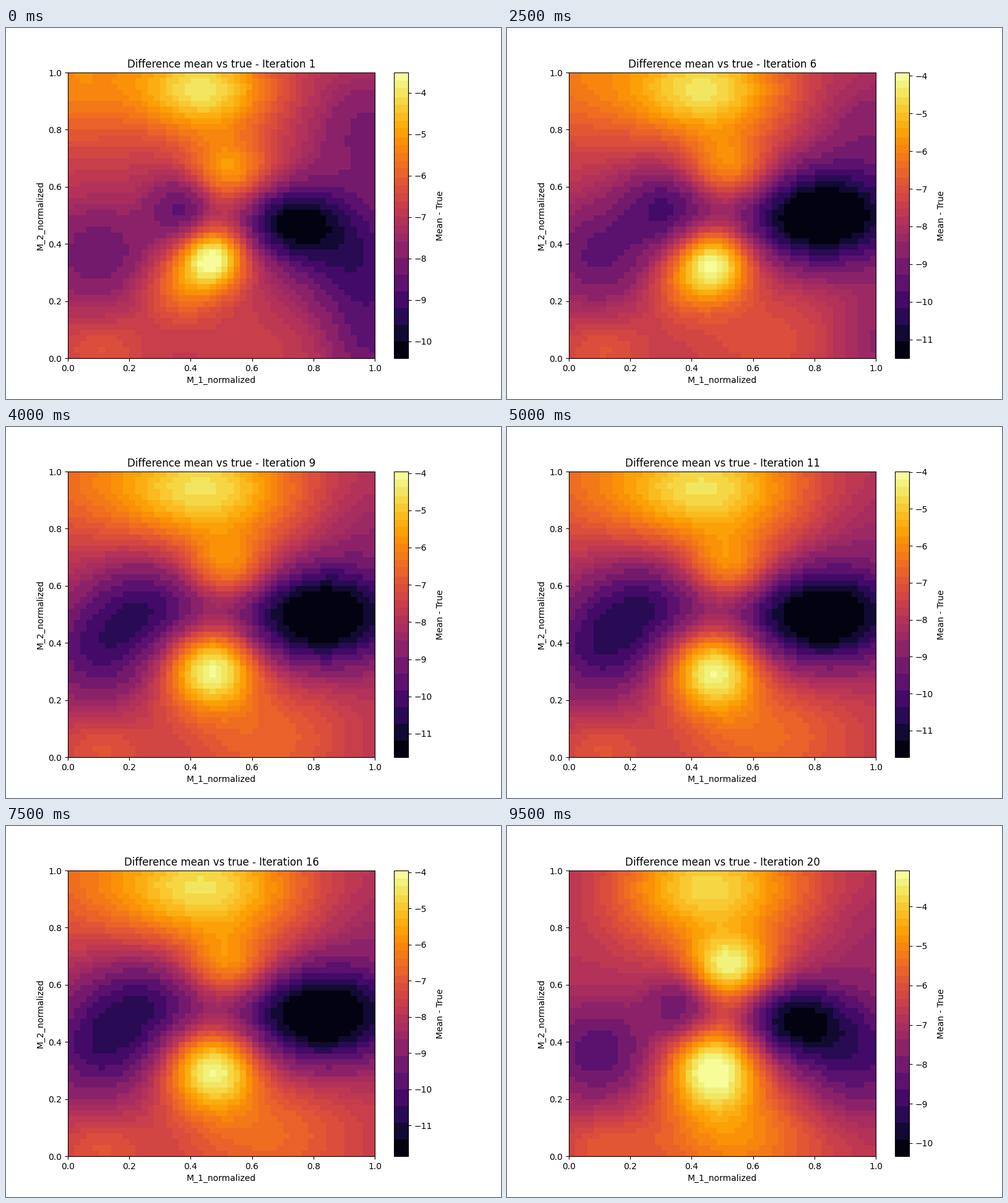
A matplotlib script that plays this animation: 800x600 px, repeating every 10000 ms.

```python
import matplotlib.pyplot as plt
import numpy as np
from matplotlib.animation import FuncAnimation
from matplotlib.colors import ListedColormap

ITERATIONS = 20
CELLS = 50
X, Y = np.meshgrid(np.linspace(0, 1, CELLS), np.linspace(0, 1, CELLS))


def ease(value, start, end):
    u = np.clip((value - start) / (end - start), 0, 1)
    return u * u * (3 - 2 * u)


def mix(a, b, u):
    return a + (b - a) * u


def hill(x, y, width, height, strength):
    return strength * np.exp(-((X - x) / width) ** 2 - ((Y - y) / height) ** 2)


def surface(iteration):
    """Difference surface as a share of the colour range."""
    grow = ease(iteration, 2, 11)
    reset = ease(iteration, 16, 20)
    left = grow * (1 - reset)
    right = ease(iteration, 1, 5) * (1 - reset)

    top = (hill(.45, .95, mix(.22, .32, grow), mix(.16, .20, grow), .41)
           + hill(0, 1, .30, .25, .24 - .12 * grow - .17 * reset))
    middle = hill(.52, .66, .15, .12, mix(.28, .44, reset))
    peak = (hill(.47, mix(.35, .31, grow), mix(.112, .155, grow),
                 mix(.11, .15, grow), .5)
            + hill(.36, .24, .13, .12, mix(.18, 0, grow)))
    bottom = (hill(mix(.65, .55, reset), .06, .30, .20,
                   .04 + .13 * grow + .07 * reset)
              + hill(.1, .02, .15, .12, .11))

    left_hollow = (hill(mix(.37, .25, left), .53, mix(.11, .23, left),
                        mix(.13, .18, left), mix(-.25, -.30, left))
                   + hill(.09, .36, .19, .18, mix(-.20, -.25, grow)))
    right_hollow = (hill(mix(.73, .83, right), mix(.48, .495, right),
                         mix(.16, .26, right), mix(.13, .17, right),
                         mix(-.42, -.60, right))
                    + hill(.93, .36, .22, .22, mix(-.30, 0, right)))
    corners = (hill(1, .80, .20, .20, mix(-.17, -.07, grow))
               + hill(1, .05, .15, .20, mix(-.20, 0, grow)))

    total = (.5 + top + middle + peak + bottom
             + left_hollow + right_hollow + corners)
    return np.clip(total, 0, 1)


def state(iteration):
    keys = [1, 4, 6, 11, 16, 20]
    low = np.interp(iteration, keys,
                    [-10.41, -11.44, -11.50, -11.72, -11.85, -10.33])
    high = np.interp(iteration, keys,
                     [-3.51, -3.74, -3.91, -3.99, -3.95, -3.09])
    return mix(low, high, surface(iteration)), low, high


def banded_inferno():
    """Inferno in flat bands, wider at the dark end."""
    edges = np.append(np.linspace(0, .41, 8), np.linspace(.41, 1, 22)[1:])
    centres = (edges[:-1] + edges[1:]) / 2
    shades = (np.arange(256) + .5) / 256
    band = np.searchsorted(edges, shades) - 1
    return ListedColormap(plt.get_cmap("inferno")(centres[band]))


fig, ax = plt.subplots(figsize=(8, 6), dpi=100)
values, low, high = state(1)
image = ax.imshow(values, cmap=banded_inferno(), vmin=low, vmax=high,
                  origin="lower", extent=(0, 1, 0, 1), aspect="auto",
                  interpolation="nearest")
fig.colorbar(image, ax=ax, label="Mean - True")
ax.set_xlabel("M_1_normalized")
ax.set_ylabel("M_2_normalized")
title = ax.set_title("")


def update(frame):
    iteration = frame + 1
    values, low, high = state(iteration)
    image.set_data(values)
    image.set_clim(low, high)
    title.set_text(f"Difference mean vs true - Iteration {iteration}")
    return image, title


anim = FuncAnimation(fig, update, frames=ITERATIONS, interval=500,
                     repeat=True, repeat_delay=0, blit=False)
plt.show()
```
